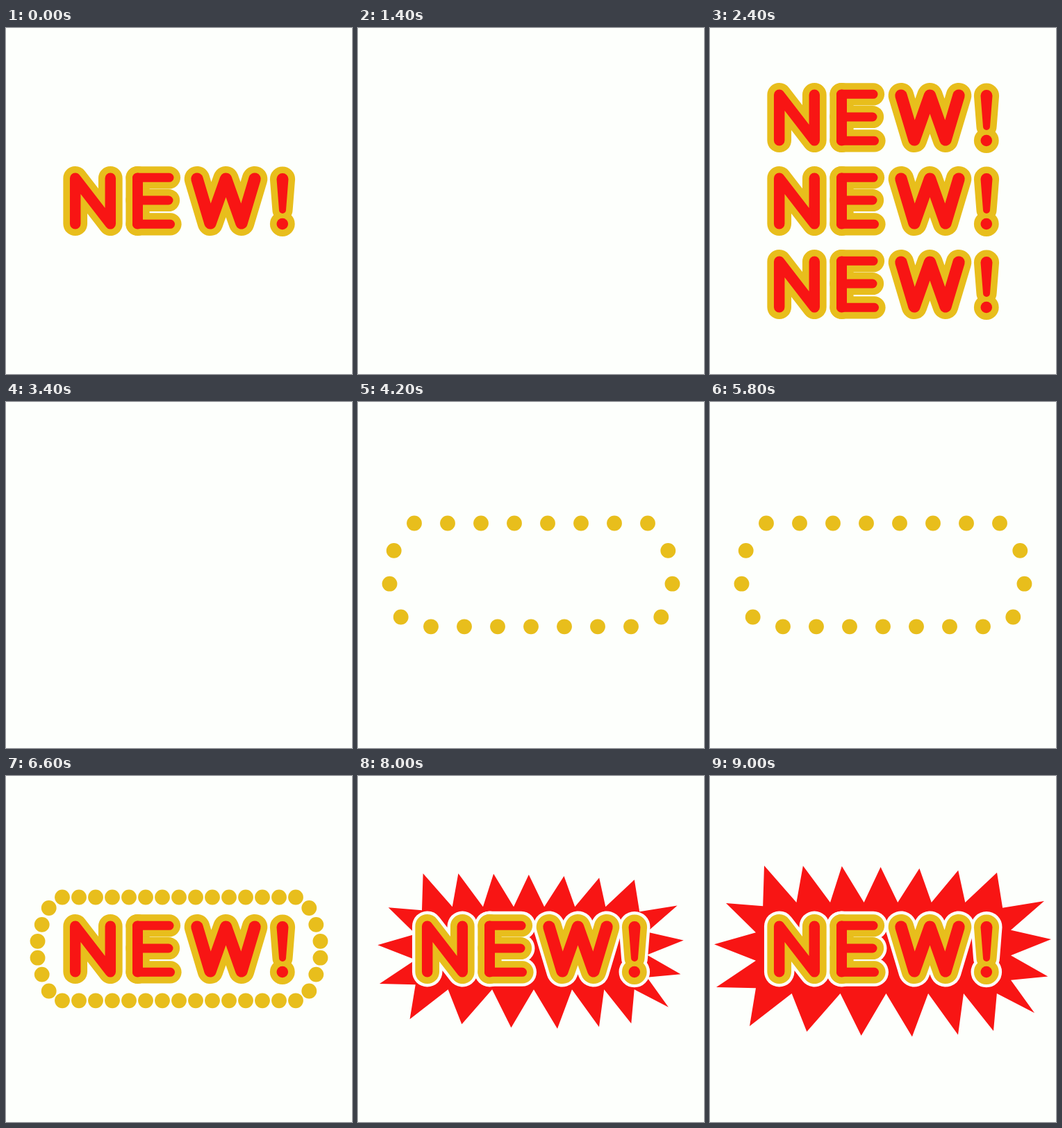
Recreate the animation shown at these times as an HTML page with a canvas. Size 498 by 498 pixels, loop 9200 ms.

```html
<!DOCTYPE html>
<html lang="en">
<head>
<meta charset="utf-8">
<title>NEW!</title>
<style>
html, body { margin: 0; width: 100%; height: 100%; overflow: hidden; background: #fdfffc; }
canvas { display: block; }
</style>
</head>
<body>
<canvas id="stage" width="498" height="498"></canvas>
<script>
const ctx = document.getElementById('stage').getContext('2d');
const RED = '#f81514', GOLD = '#e8be1c', PAPER = '#fdfffc';
const SIZE = 498, STEP = 200, STEPS = 46;
const TOP = 208.5, BASE = 289.5;
const CENTER = { x: 248, y: 250.8 };

const clamp = (v, low, high) => Math.min(high, Math.max(low, v));

// Points spread from a to b, bulging to the left of the way
function edge([ax, ay], [bx, by], count, bulge = 0, power = 1) {
  const dx = bx - ax, dy = by - ay, length = Math.hypot(dx, dy);
  return Array.from({ length: count }, (_, i) => {
    const p = i / (count - 1);
    const along = p ** power, out = bulge * Math.sin(p * Math.PI) / length;
    return [ax + dx * along + dy * out, ay + dy * along - dx * out];
  });
}

// Stroke running between the top and the base of the line
function zigzag(width, fromTop, xs) {
  const ends = [TOP + width / 2, BASE - width / 2];
  return { width, points: xs.map((x, i) => [x, ends[(i + !fromTop) % 2]]) };
}

const arm = (y, end) => ({ width: 13, points: [[188.5, y], [end, y]] });

const strokes = [
  zigzag(15.5, false, [99.7, 99.7, 150.3, 150.3]),
  zigzag(15, true, [189.5, 189.5]),
  arm(215.3, 235), arm(248, 234), arm(282.3, 236.5),
  zigzag(17.5, true, [-41.5, -22.5, 0, 22.5, 41.5].map(x => 316.5 + x))
];

const mark = new Path2D();
mark.arc(398, 217.5, 8.5, Math.PI, 0);
mark.arc(398, 262, 5, 0, Math.PI);
mark.closePath();
const point = new Path2D();
point.arc(397.8, 282, 8.3, 0, Math.PI * 2);

const bulbs = [
  ...edge([81, 174.5], [417, 174.5], 15),
  ...edge([436.3, 190], [436.3, 309.5], 6, 17),
  ...edge([417, 323.3], [81, 323.3], 15),
  ...edge([61.7, 309.5], [61.7, 190], 6, 17)
];

const tips = [
  ...edge([78, 129], [413, 139], 7, 3),
  ...edge([481, 180], [467, 341], 4, 17),
  ...edge([408, 367], [57, 360], 6, 11, 1.2),
  ...edge([9, 304], [23, 183], 3, 10)
];

// Each tip is followed by a notch pulled in towards the centre
const burst = tips.flatMap((tip, i) => {
  const next = tips[(i + 1) % tips.length];
  const midX = (tip[0] + next[0]) / 2, midY = (tip[1] + next[1]) / 2;
  return [tip, [
    clamp(CENTER.x + (midX - CENTER.x) * 0.87, 66, 433),
    clamp(CENTER.y + (midY - CENTER.y) * 0.67, 182, 313)
  ]];
});

function trace(points) {
  ctx.beginPath();
  points.forEach(([x, y]) => ctx.lineTo(x, y));
}

function drawLetters(color, grow) {
  ctx.strokeStyle = ctx.fillStyle = color;
  for (const { width, points } of strokes) {
    ctx.lineWidth = width + grow * 2;
    trace(points);
    ctx.stroke();
  }
  for (const shape of [mark, point]) {
    ctx.fill(shape);
    if (grow) {
      ctx.lineWidth = grow * 2;
      ctx.stroke(shape);
    }
  }
}

function drawWord(dy = 0, halo = false) {
  ctx.save();
  ctx.translate(0, dy);
  if (halo) drawLetters(PAPER, 14);
  drawLetters(GOLD, 9.6);
  drawLetters(RED, 0);
  ctx.restore();
}

function drawBulbs(shown) {
  ctx.fillStyle = GOLD;
  for (const [x, y] of bulbs.filter((_, i) => shown(i))) {
    ctx.beginPath();
    ctx.arc(x, y, 10.9, 0, Math.PI * 2);
    ctx.fill();
  }
}

function drawBurst(scale) {
  ctx.save();
  ctx.translate(CENTER.x, CENTER.y);
  ctx.scale(scale, scale);
  ctx.translate(-CENTER.x, -CENTER.y);
  trace(burst);
  ctx.fillStyle = RED;
  ctx.fill();
  ctx.restore();
}

function drawStep(n) {
  const odd = n % 2 === 1;
  ctx.fillStyle = PAPER;
  ctx.fillRect(0, 0, SIZE, SIZE);
  if (n < 10) {
    if (!odd) drawWord();
  } else if (n < 20) {
    if (!odd) [-120, 0, 120].forEach(dy => drawWord(dy));
  } else if (n < 31) {
    drawBulbs(i => (i % 2 === 0) === odd);
  } else if (n < 37) {
    if (odd) {
      drawBulbs(() => true);
      drawWord();
    }
  } else {
    drawBurst(odd ? 1 : 0.908);
    drawWord(0, true);
  }
}

function tick() {
  drawStep(Math.floor(performance.now() / STEP) % STEPS);
  requestAnimationFrame(tick);
}

ctx.lineCap = ctx.lineJoin = 'round';
tick();
</script>
</body>
</html>
```
